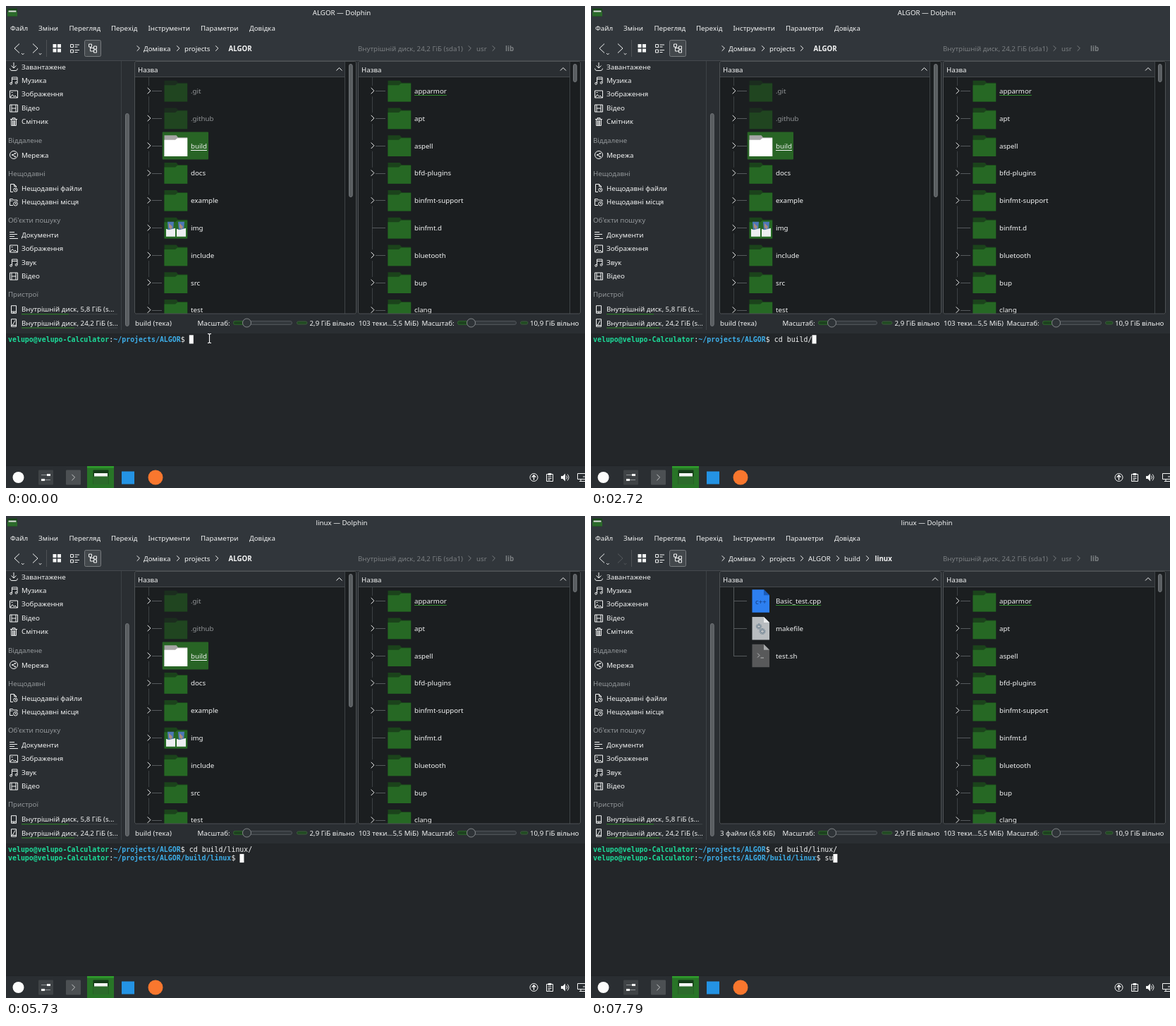
These frames come from a looping animation (821x683 px, 8000 ms). An HTML page with a canvas:

```html
<!DOCTYPE html>
<html lang="uk">
<head>
<meta charset="utf-8">
<title>Dolphin</title>
<style>
html, body { margin: 0; width: 100%; height: 100%; overflow: hidden; background: #232629; }
canvas { display: block; }
</style>
</head>
<body>
<canvas id="stage" width="821" height="683"></canvas>
<script>
const ctx = document.getElementById('stage').getContext('2d');
const SANS = '9.72px "Noto Sans", sans-serif';
const BOLD = 'bold ' + SANS;
const MONO = '9.92px "DejaVu Sans Mono", monospace';
const CELL = 5.972, LINE = 12.6;
const WHITE = '#f4f5f5', DIM = '#7b7f82', EDGE = '#4d5154', VIEW = '#1b1e20', WINDOW = '#2a2e32';
const PANE_SHIFT = 317;

// Typed text after each key press
const COMMAND = [[0, ''], [910, 'c'], [1180, 'cd'], [1720, 'cd '], [2190, 'cd b'], [2390, 'cd bu'],
  [2720, 'cd build/'], [3400, 'cd build/l'], [3610, 'cd build/li'], [3800, 'cd build/lin'], [3930, 'cd build/linux/']];
const NEXT_COMMAND = [[0, ''], [7600, 's'], [7790, 'su']];
const ENTER = 4390, RETITLE = 5730, OPEN = 5790, COUNT = 5860;

const LEFT_FOLDERS = ['.git', '.github', 'build', 'docs', 'example', 'img', 'include', 'src', 'test'];
const RIGHT_FOLDERS = ['apparmor', 'apt', 'aspell', 'bfd-plugins', 'binfmt-support', 'binfmt.d', 'bluetooth', 'bup', 'clang'];

// Outlines in a 12 by 12 box
const ICONS = {
  download: 'M6 0V8M2.5 4.5L6 8l3.5-3.5M.5 8.5Q1 11.5 3 11.5H9Q11 11.5 11.5 8.5',
  music: 'M3.5 9.5V1H11V8.5M3.5 3.5H11M3.5 9.8a1.4 1.4 0 1 1-2.8 0a1.4 1.4 0 1 1 2.8 0M11 8.8a1.4 1.4 0 1 1-2.8 0a1.4 1.4 0 1 1 2.8 0',
  image: 'M.5 1h11v10h-11zM1 10.5L4 6.5l2.5 3L8 8l3 3M2.5 3.5h2',
  video: 'M.5 1h11v10h-11zM3 1v10M9 1v10M3 6h6',
  trash: 'M1 2.5h10M4 2.5V.7h4v1.8M2.5 3v8.4h7V3M4.5 4v7M6 4v7M7.5 4v7',
  network: 'M11.5 6a5.5 5.5 0 1 1-11 0a5.5 5.5 0 1 1 11 0M8 4L4 6l4 2.5M3.5 5.5h1v1h-1zM7.5 3.5h1v1h-1zM7.5 8h1v1h-1z',
  recentFile: 'M5 11.5H1.5V.5h5l3 3V5M6.5.5v3h3M11 8.5a2.6 2.6 0 1 1-5.2 0a2.6 2.6 0 1 1 5.2 0M8.4 7v1.7h1.2',
  recentPlace: 'M5 10.5H.5V1.5h4l1 1.5h5.5v2M.5 4h4M11.3 8.2a2.8 2.8 0 1 1-5.6 0a2.8 2.8 0 1 1 5.6 0M8.5 6.6v1.7h1.2',
  lines: 'M0 1.5h7M0 4.5h11M0 7.5h7M0 10.5h12',
  disk: 'M2.5.7h7v10.6h-7zM2.5 9h7M4.5 10.2h3',
  root: 'M2.5.7h7v10.6h-7zM4 9.5l4-7M2.5 9.5h7'
};
const PLACES = [
  ['Завантажене', 86, 'download'], ['Музика', 105.4, 'music'], ['Зображення', 124.8, 'image'],
  ['Відео', 144.2, 'video'], ['Смітник', 163.6, 'trash'], ['Віддалене', 190], ['Мережа', 211, 'network'],
  ['Нещодавні', 237], ['Нещодавні файли', 258, 'recentFile'], ['Нещодавні місця', 277.4, 'recentPlace'],
  ["Об'єкти пошуку", 303], ['Документи', 324.4, 'lines'], ['Зображення', 343.8, 'image'],
  ['Звук', 363.2, 'music'], ['Відео', 382.6, 'video'], ['Пристрої', 408.5],
  ['Внутрішній диск, 5,8 ГіБ (s...', 429.5, 'disk'], ['Внутрішній диск, 24,2 ГіБ (s...', 449, 'root']
];

function rect(x, y, w, h, color) {
  ctx.fillStyle = color;
  ctx.fillRect(x, y, w, h);
}
function box(x, y, w, h, r, fill, stroke) {
  ctx.beginPath();
  ctx.roundRect(x, y, w, h, r);
  if (fill) { ctx.fillStyle = fill; ctx.fill(); }
  if (stroke) { ctx.strokeStyle = stroke; ctx.lineWidth = 1; ctx.stroke(); }
}
function disc(x, y, r, fill, stroke) {
  box(x - r, y - r, 2 * r, 2 * r, r, fill, stroke);
}
function stroke(path, x, y, color = WHITE, width = 1) {
  ctx.save();
  ctx.translate(x, y);
  ctx.strokeStyle = color;
  ctx.lineWidth = width;
  ctx.stroke(new Path2D(path));
  ctx.restore();
}
function fill(path, x, y, color) {
  ctx.save();
  ctx.translate(x, y);
  ctx.fillStyle = color;
  ctx.fill(new Path2D(path));
  ctx.restore();
}
// y is the middle of the capitals
function text(s, x, y, color = WHITE, font = SANS, align = 'left') {
  ctx.font = font;
  ctx.textAlign = align;
  ctx.fillStyle = color;
  ctx.fillText(s, x, y + 3.5);
  return ctx.measureText(s).width;
}
function chevron(x, y, color = WHITE, size = 3.7, width = 1) {
  stroke(`M${-size / 2} ${-size}L${size / 2} 0L${-size / 2} ${size}`, x, y, color, width);
}

function drawHeader(t) {
  const opened = t >= OPEN;
  rect(0, 0, 821, 77, '#31363b');
  rect(0, 77, 821, 1, '#45494d');
  box(2, 3.5, 14, 11, 1, '#174619');
  rect(2, 8.5, 14, 6, '#2b6a2a');
  rect(3.5, 6.5, 11, 2, '#dfe4df');
  text(`${t < RETITLE ? 'ALGOR' : 'linux'} — Dolphin`, 476, 9.3, WHITE, SANS, 'center');
  [['Файл', 6], ['Зміни', 46], ['Перегляд', 89.5], ['Перехід', 149], ['Інструменти', 201.5],
    ['Параметри', 276], ['Довідка', 345]].forEach(([s, x]) => text(s, x, 31.7));

  const forward = opened ? '#565a5e' : WHITE;
  stroke('M19 53.5L12 60l7 6.5M22 67l1.8 1.8L25.6 67', 0, 0);
  stroke('M38 53.5L45 60l-7 6.5M46.7 67l1.8 1.8L50.3 67', 0, 0, forward);
  rect(57, 48, 1, 24, EDGE);
  for (const x of [66.5, 73]) for (const y of [54, 60.5]) rect(x, y, 5, 5, WHITE);
  for (const y of [54, 61.5]) {
    stroke('M.5.5h4v4h-4z', 91, y);
    stroke('M0 1h6.5M0 4h4', 97.5, y);
  }
  box(111.5, 48.5, 23, 23, 2, '#43484c', '#777b7e');
  stroke('M.5.5h4v4h-4zM7.5 3.5h4v4h-4zM7.5 8.5h4v4h-4zM2.5 4.5v6h5M2.5 6h5', 117, 53.5);

  chevron(187.5, 60);
  text('Домівка', 195, 60.3);
  chevron(244, 60);
  text('projects', 253, 60.3);
  chevron(299, 60);
  if (opened) {
    text('ALGOR', 308, 60.3);
    chevron(350, 60);
    text('build', 359, 60.3);
    chevron(392, 60);
    text('linux', 402.5, 60.3, WHITE, BOLD);
  } else text('ALGOR', 315.5, 60.3, WHITE, BOLD);
  text('Внутрішній диск, 24,2 ГіБ (sda1)', 499, 60.3, DIM);
  chevron(657.5, 60, DIM);
  text('usr', 667, 60.3, DIM);
  chevron(691.5, 60, DIM);
  text('lib', 708, 60.3, DIM, BOLD);
}

function scrollbar(x, y, h) {
  box(x + .5, y + .5, 4.7, h - 1, 2.4, '#595d60', '#72767a');
}

function drawPlaces() {
  for (const [label, y, icon] of PLACES) {
    text(label, icon ? 22 : 3, y, icon ? WHITE : '#94989b');
    if (icon) stroke(ICONS[icon], 5, Math.round(y - 5.7));
  }
  for (const [y, used] of [[436, 67], [455.5, 75]]) {
    rect(22, y, 136, 1.2, '#3b4044');
    rect(22, y, used, 1.2, '#2a7526');
  }
  rect(163, 78, 1, 381, '#3c4145');
  scrollbar(169, 152, 302);
}

function folder(x, y, front, back) {
  fill('M0-14H17L19.5-11H32.7V15.7H0z', x, y, back);
  fill('M0-7.5H15.5L18.5-10H32.7V15.7H0z', x, y, front);
}
function photos(x, y) {
  for (const dx of [2.5, 17.5]) {
    fill('M2-8H11L10 4H3z', x + dx, y, '#4d77b8');
    fill('M4-6l5 5-2 4-3-3z', x + dx, y, '#a98b7e');
    fill('M0 2L4 3.5L8 2.5L13 1V13H0z', x + dx, y, '#eceef0');
  }
}
function drawFolders(names, dx, current, hasBranch) {
  names.forEach((name, i) => {
    const y = 120.2 + 38.8 * i, hidden = name[0] === '.', selected = name === 'build';
    const branch = hasBranch(name), iconX = 224.5 + dx, iconY = y - .5;
    rect(202 + dx, i ? y - 30.8 : 101, 1, i ? 23 : 12, '#3d4144');
    if (branch) chevron(202.8 + dx, y, WHITE, 4.2);
    else rect(202 + dx, y - 8, 1, 16, '#3d4144');
    rect(branch ? 207 + dx : 202 + dx, Math.round(y), branch ? 14 : 19, 1, '#55595c');
    if (selected) box(221.7 + dx, y - 19.4, 65.3, 39, 1, '#286425');
    ctx.globalAlpha = hidden ? .42 : 1;
    if (selected) folder(iconX, iconY, '#ffffff', '#a6a6a6');
    else folder(iconX, iconY, '#266824', '#1b431b');
    ctx.globalAlpha = 1;
    if (name === 'img') photos(iconX, iconY);
    const width = text(name, 262 + dx, y + .3, hidden ? '#909395' : WHITE);
    if (name === current) rect(262 + dx, Math.round(y + 6), width, 1, selected ? WHITE : '#2f8a2a');
  });
}

function drawFiles() {
  const docs = [['Basic_test.cpp', '#2d7ff0', '#1b5bb8'], ['makefile', '#b9bdc0', '#eceeef'], ['test.sh', '#58595a', '#a7a9aa']];
  rect(202, 101, 1, 97, '#55595c');
  docs.forEach(([name, color, fold], i) => {
    const y = 120.2 + 38.8 * i;
    rect(202, Math.round(y), 19, 1, '#55595c');
    fill('M0-16H16.5L24.5-8V16.5H0z', 228.5, y, color);
    fill('M16.5-16V-8H24.5z', 228.5, y, fold);
    const width = text(name, 262, y + .3);
    if (!i) rect(262, Math.round(y + 6), width, 1, '#2f8a2a');
  });
  text('c++', 241, 121.5, '#153f85', SANS, 'center');
  for (const [x, y, r] of [[238, 156.5, 2.7], [243, 163.5, 3]]) {
    ctx.setLineDash([1.4, 1]);
    disc(x, y, r + 1, null, '#5f7688');
    ctx.setLineDash([]);
    disc(x, y, r - .4, null, '#5f7688');
  }
  stroke('M0 0l3 3-3 3M4.5 6.5h4.5', 236, 194.5, '#b8babb');
}

function pane(x, right, caret, bar) {
  rect(x, 78, right - x, 358, VIEW);
  rect(x, 79, (bar || right) - x, 21, WINDOW);
  rect(x, 100, (bar || right) - x, 1, '#454a4d');
  text('Назва', x + 5, 90);
  stroke('M-4 2L0-2L4 2', caret, 89.5);
  if (bar) rect(bar, 79, 1, 357, '#3f4447');
}
function drawPanes(t) {
  const opened = t >= OPEN;
  pane(182, 497, opened ? 488 : 472.5, opened ? 0 : 480);
  pane(499, 815, 790, 799);
  ctx.save();
  ctx.beginPath();
  ctx.rect(182, 101, 633, 335);
  ctx.clip();
  if (opened) drawFiles();
  else drawFolders(LEFT_FOLDERS, 0, 'build', () => true);
  drawFolders(RIGHT_FOLDERS, PANE_SHIFT, 'apparmor', name => name !== 'binfmt.d');
  ctx.restore();
  if (!opened) scrollbar(486, 82, 189);
  scrollbar(804, 82, 26);
  box(182.5, 78.5, 314, 357.5, 2, null, EDGE);
  box(499.5, 78.5, 315, 357.5, 2, null, EDGE);
}

function statusBar(x, label, zoomX, barX, barWidth, free, freeX) {
  const y = 449;
  text(label, x, y);
  text('Масштаб:', zoomX, y);
  box(zoomX + 51, y - 2.5, 83, 5, 2.5, '#34393d', '#50555a');
  box(zoomX + 51, y - 2.5, 18, 5, 2.5, '#1d421f', '#2b5f2a');
  disc(zoomX + 70, y, 6, '#2e3337', '#84888b');
  box(barX + .5, y - 2, barWidth, 4, 2, '#1f4a20', '#3c5a3d');
  text(free, freeX, y);
}

const latest = (steps, t) => steps.findLast(([at]) => t >= at)[1];

function prompt(row, path, typed, active) {
  const y = 472.4 + row * LINE, user = 'velupo@velupo-Calculator';
  let x = 3;
  for (const [s, color, font] of [[user, '#1cdc9a', 'bold ' + MONO], [':', WHITE, MONO],
    [path, '#3daee9', 'bold ' + MONO], ['$ ' + typed, WHITE, MONO]]) {
    text(s, x, y - .2, color, font);
    x += s.length * CELL;
  }
  if (active) rect(x, y - 6.1, 6, 12.2, '#fcfcfc');
}
function drawTerminal(t) {
  rect(0, 464, 821, 188, '#232629');
  const home = '~/projects/ALGOR';
  prompt(0, home, latest(COMMAND, t), t < ENTER);
  if (t >= ENTER) prompt(1, home + '/build/linux', latest(NEXT_COMMAND, t), true);
  if (t < 910) {
    const beam = 'M-2.5.5H-1L0 1.5L1 .5H2.5M0 1.5V12.5M-2.5 13.5H-1L0 12.5L1 13.5H2.5';
    stroke(beam, t < 70 ? 288.5 : 287.5, 464, '#fcfcfc', 1.1);
  }
}

function drawTaskbar() {
  rect(0, 651, 821, 32, WINDOW);
  rect(0, 651, 821, 1, '#202326');
  disc(17.5, 668, 8, '#fcfcfc');
  box(46, 657.5, 21, 21, 1, '#3f4346');
  stroke('M50 664.5h13M50 671.5h13', 0, 0, '#909496');
  rect(58, 663, 5, 3, WHITE);
  rect(50, 670, 5, 3, WHITE);
  box(85, 657.5, 21, 21, 1, '#4c5053');
  chevron(95.5, 668, '#c5c7c8', 4.2);
  rect(115, 652, 38, 31, '#287427');
  rect(115, 652, 38, 2.5, '#2f9d2c');
  box(123.5, 657.5, 22, 20.5, 1, '#143b17');
  rect(125, 662, 19, 5, '#f5f6f5');
  rect(123.5, 666.5, 22, 11.5, '#2c6b2b');
  rect(164, 659.5, 18, 18, '#2493e4');
  disc(212, 668, 10.5, '#f9772e');

  disc(748.5, 668, 5.5, '#2a2e32', WHITE);
  stroke('M0 4V-3M-2.7 0L0-3L2.7 0', 748.5, 667.7, WHITE, 1.4);
  stroke('M.5 1.5h9v10h-9zM3 .5h4v2H3zM2.5 5h5M2.5 7.5h5M2.5 9.5h3', 766, 662);
  fill('M0 4h2.5L6 .5v11L2.5 8H0z', 787, 662, WHITE);
  stroke('M7.5 3.5Q9.5 6 7.5 8.5M9 1.5Q13 6 9 10.5', 787, 662);
  stroke('M12 .5H.5v8H12M3 11.5h9M5 8.5v3M8 5h4', 810, 662);
}

function draw(now) {
  const t = now % 8000;
  rect(0, 0, 821, 683, WINDOW);
  drawHeader(t);
  drawPlaces();
  drawPanes(t);
  statusBar(183, t < COUNT ? 'build (тека)' : '3 файли (6,8 КіБ)', 271.5, 412, 14.5, '2,9 ГіБ вільно', 430.5);
  statusBar(500, '103 теки...5,5 МіБ)', 589.5, 729, 10.5, '10,9 ГіБ вільно', 743);
  drawTerminal(t);
  drawTaskbar();
  requestAnimationFrame(draw);
}
requestAnimationFrame(draw);
</script>
</body>
</html>
```
